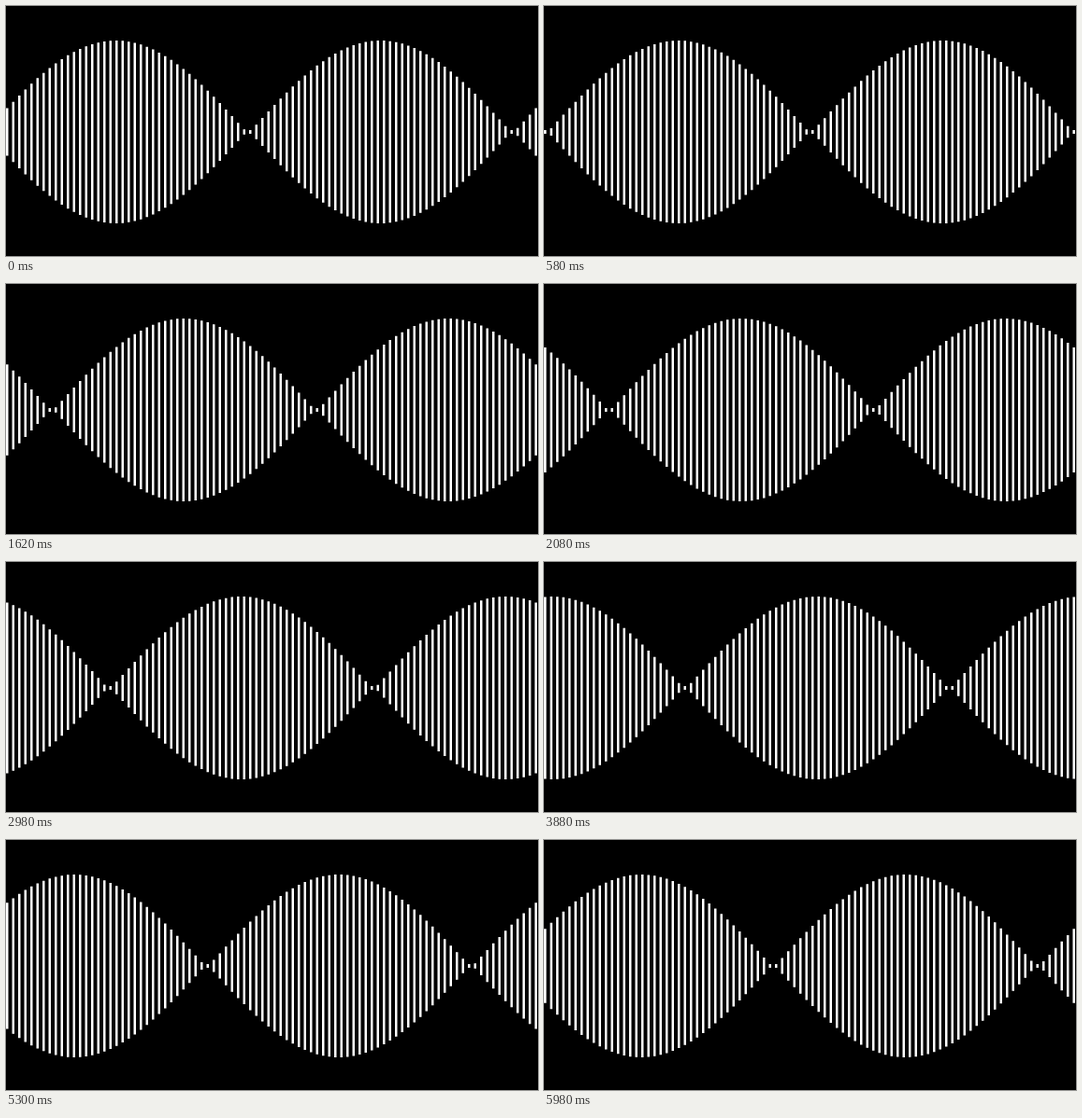
Animation of 569 by 268 pixels, one loop 6 s. Source, as an HTML page:

```html
<!DOCTYPE html>
<html lang="en">
<head>
<meta charset="utf-8">
<title>Travelling wave</title>
<style>
  html, body { margin: 0; width: 100%; height: 100%; overflow: hidden; background: #000; }
  svg { display: block; width: 569px; height: 268px; }
</style>
</head>
<body>
<svg viewBox="0 0 569 268"><path id="bars" fill="#fff"/></svg>
<script>
  const LOOP = 6000, STEP = 20;
  const COUNT = 88, PITCH = 6.5, WIDTH = 2.5, MIDDLE = 135;
  const START_PHASE = 2.863, PHASE_PER_STEP = 0.01;
  const bars = document.getElementById('bars');

  function barPath(i, phase) {
    const wave = Math.abs(Math.sin(i / (COUNT - 1) * 2 * Math.PI - phase));
    const half = Math.max(2, 100 * wave - 2);
    const top = (MIDDLE - half).toFixed(2);
    return `M${i * PITCH} ${top}h${WIDTH}v${(2 * half).toFixed(2)}h${-WIDTH}z`;
  }

  function draw(time) {
    const step = Math.floor((time % LOOP) / STEP);
    const phase = START_PHASE + step * PHASE_PER_STEP;
    bars.setAttribute('d', Array.from({ length: COUNT }, (_, i) => barPath(i, phase)).join(''));
  }

  const start = performance.now();
  function tick() {
    draw(performance.now() - start);
    requestAnimationFrame(tick);
  }
  tick();
</script>
</body>
</html>
```
